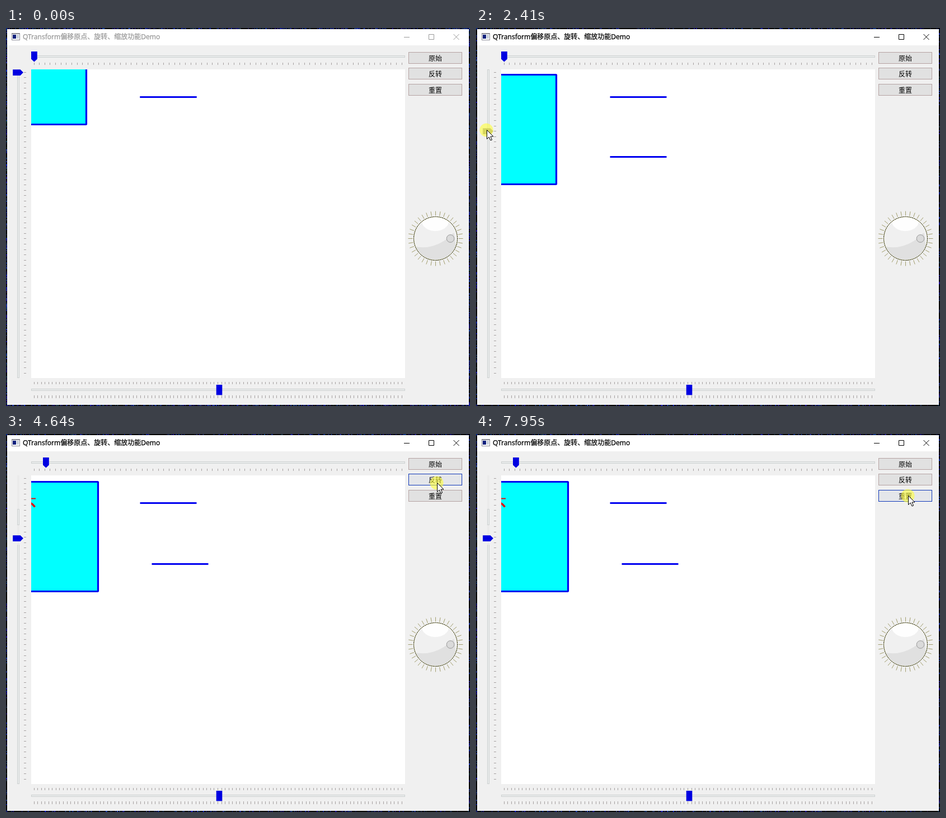
Write an HTML page with a canvas that moves like this. It is 829 by 676 pixels and loops after 8000 ms.

```html
<!DOCTYPE html>
<html lang="zh">
<head>
<meta charset="utf-8">
<title>QTransform Demo</title>
<style>
  html, body { margin: 0; width: 100%; height: 100%; overflow: hidden; background: #000; }
  canvas, svg { position: absolute; left: 0; top: 0; display: block; }
  text { font: 12px "Noto Sans", "Noto Sans CJK SC", "Noto Sans CJK", sans-serif; }
  .crisp { shape-rendering: crispEdges; }
  .track { fill: #e9ebeb; stroke: #cdd1d1; }
  .handle { fill: #0000e1; }
  .tick { stroke: #a5a0a0; fill: none; }
  .pen { stroke: #0000f0; stroke-width: 3.2; }
  .button rect { fill: #e1e1e1; stroke: #b5a3a3; }
  .button.hover rect { fill: #e4e6ea; stroke: #1038b8; }
  .button text { text-anchor: middle; }
  #caption text { fill: currentColor; stroke: currentColor; stroke-width: .25; }
</style>
</head>
<body>
<canvas id="desktop" width="829" height="676"></canvas>
<svg width="829" height="676" viewBox="0 0 829 676">
  <defs>
    <clipPath id="viewClip"><rect x="45" y="74" width="668" height="552"/></clipPath>
    <clipPath id="dialClip"><circle cx="767.5" cy="376.5" r="39"/></clipPath>
  </defs>
  <rect x="2" y="2" width="825" height="672" fill="#f0f0f0"/>
  <rect x="2" y="2" width="825" height="29" fill="#fff"/>

  <g class="crisp">
    <rect x="10" y="9" width="15" height="13" fill="#8c8c96"/>
    <rect x="11" y="11" width="13" height="10" fill="#fff"/>
    <rect x="12" y="12" width="6" height="7" fill="#10207c"/>
    <rect x="19" y="12" width="4" height="7" fill="#c8d0dc"/>
  </g>
  <g id="caption">
    <text x="30" y="20.3">QTransform偏移原点、旋转、缩放功能Demo</text>
    <path d="M711 16.5h10M755.5 11.5h9v9h-9zM799.5 11l10 10M809.5 11l-10 10" fill="none" stroke="currentColor"/>
  </g>

  <g class="crisp">
    <rect class="track" x="45.5" y="49.5" width="667" height="3"/>
    <rect class="track" x="20.5" y="74.5" width="3" height="551"/>
    <rect class="track" x="45.5" y="645.5" width="667" height="3"/>
    <g id="wornTrack">
      <rect x="20" y="74" width="4" height="124" fill="#ebebeb"/>
      <rect class="track" x="20.5" y="134.5" width="3" height="28"/>
    </g>
    <path id="ticks" class="tick"/>
  </g>
  <path id="topHandle" class="handle" d="M45 42h10.8v13.4l-5.4 5.2l-5.4-5.2z"/>
  <path id="leftHandle" class="handle" d="M12.2 74.2h13.4l5.3 5.4l-5.3 5.4h-13.4z"/>
  <rect class="handle" x="375.7" y="638" width="10.6" height="18.4"/>

  <rect x="45" y="74" width="668" height="552" fill="#fff"/>
  <g clip-path="url(#viewClip)">
    <g id="shape">
      <rect class="pen" x="-52.5" y="-23.5" width="196" height="196" fill="#0ff" stroke-linejoin="bevel"/>
      <path d="M18 6.5h14" stroke="#e01010" stroke-width="2"/>
      <path d="M23 14.5q4 2 7.5 7" fill="none" stroke="#e01010" stroke-width="3.6"/>
      <path class="pen" d="M239.5 123.5h101"/>
    </g>
    <path class="pen" d="M239.5 123.5h101"/>
  </g>

  <path id="dialTicks" fill="none" stroke="#a19d6c"/>
  <g clip-path="url(#dialClip)">
    <circle cx="767.5" cy="376.5" r="39" fill="#f0f0f0"/>
    <path d="M726 390Q768 400 800 366L809 420H726z" fill="#e0e0e0"/>
    <ellipse cx="767" cy="346" rx="24" ry="17" fill="#fefefe"/>
  </g>
  <g fill="none">
    <circle cx="767.5" cy="376.5" r="39" stroke="#d9d78c"/>
    <circle cx="767.5" cy="376.5" r="39" stroke="#000" stroke-dasharray="2 1.2"/>
  </g>
  <circle cx="794" cy="376.5" r="6.8" fill="#dadada" stroke="#999"/>

  <g id="buttons"></g>
  <circle id="halo" r="12" fill="#ffff38" fill-opacity=".6"/>
  <path id="cursor" d="M.5 .5V16.5L4.2 13L7 19L9.6 18L6.9 12H12z" fill="#fff" stroke="#000"/>
</svg>
<script>
const LOOP = 8000, ENTER = 320, STEP = 110;
const $ = id => document.getElementById(id);

// Pointer journey: each leg eases to its goal, then rests there
const legs = [
  { from: ENTER, lasts: 880, x: 11, y: 74 },
  { from: 1200, lasts: 300, x: 19, y: 75 },
  { from: 1500, lasts: 1000, x: 19, y: 184 },
  { from: 2600, lasts: 370, x: 52, y: 48 },
  { from: 3090, lasts: 440, x: 73, y: 48 },
  { from: 3530, lasts: 560, x: 774, y: 120 },
  { from: 4090, lasts: 440, x: 770, y: 87 },
  { from: 5620, lasts: 310, x: 770, y: 55 },
  { from: 6710, lasts: 440, x: 772, y: 125 },
  { from: 7490, lasts: 340, x: 772, y: 110 }
];
const leftDrag = { from: 1430, to: 2510 };
const topDrag = { from: 2960, to: 3530 };
const [invertClick, restoreClick, resetClick] =
  [4600, 5930, 7830].map(from => ({ from, to: from + 200 }));
const presses = [leftDrag, topDrag, invertClick, restoreClick, resetClick];

const clamp = (v, low, high) => Math.min(high, Math.max(low, v));
const within = (v, low, high) => v >= low && v < high;
const during = (t, span) => within(t, span.from, span.to);
const smooth = p => p * p * (3 - 2 * p);

function pointerAt(t) {
  return legs.reduce((at, leg) => {
    const p = smooth(clamp((t - leg.from) / leg.lasts, 0, 1));
    return { x: at.x + (leg.x - at.x) * p, y: at.y + (leg.y - at.y) * p };
  }, { x: 475, y: 505 });
}

function dragged(t, span, axis) {
  const now = pointerAt(clamp(t, span.from, span.to));
  return Math.max(0, Math.round(now[axis] - (axis === 'x' ? 52 : 75)));
}

const move = (id, x, y) => $(id).setAttribute('transform', `translate(${x} ${y})`);
const show = (id, on) => { $(id).style.display = on ? '' : 'none'; };

function series(count, from, to, draw) {
  return Array.from({ length: count + 1 }, (_, i) =>
    draw(Math.floor(from + (to - from) * i / count) + .5)).join('');
}

$('ticks').setAttribute('d',
  series(68, 50, 707, x => `M${x} 62v4`) +
  series(56, 79, 617, y => `M32 ${y}h4`) +
  series(100, 50, 707, x => `M${x} 633v4M${x} 657v5`));

$('dialTicks').setAttribute('d', Array.from({ length: 36 }, (_, i) => {
  const a = i * Math.PI / 18;
  const at = r => `${767.5 + r * Math.cos(a)} ${376.5 + r * Math.sin(a)}`;
  return `M${at(41)}L${at(49)}`;
}).join(''));

const buttonTop = i => Math.round(43 + 28.3 * i);
$('buttons').innerHTML = ['原始', '反转', '重置'].map((label, i) =>
  `<g class="button"><rect class="crisp" x="719.5" y="${buttonTop(i) + .5}" width="95" height="20"/>
   <text x="767" y="${buttonTop(i) + 15.5}">${label}</text></g>`).join('');
const buttons = [...$('buttons').children];

// Thin strip of desktop visible around the window
function paintDesktop(density) {
  const g = $('desktop').getContext('2d');
  let seed = 31;
  const rand = () => (seed = seed * 16807 % 2147483647) / 2147483647;
  const dot = (x, y) => {
    if (rand() > density) return;
    g.fillStyle = `rgb(${rand() * 40}, ${rand() * 70}, ${60 + rand() * 150})`;
    g.fillRect(x, y, 1 + rand(), 1 + rand());
  };
  g.fillStyle = '#000';
  g.fillRect(0, 0, 829, 676);
  for (let x = 0; x < 829; x++) { dot(x, 0); dot(x, 674); }
  for (let y = 0; y < 676; y++) { dot(0, y); dot(827, y); }
}

let wasActive = null;

function render(now) {
  const clock = now % LOOP;
  const t = ENTER + Math.floor((clock - ENTER) / STEP) * STEP;
  const { x, y } = pointerAt(t);
  const dx = dragged(t, topDrag, 'x'), dy = dragged(t, leftDrag, 'y');
  const active = t >= leftDrag.from;
  const inverted = within(t, invertClick.from + STEP, restoreClick.from + STEP);

  move('cursor', Math.round(x), Math.round(y));
  move('halo', Math.round(x) - .5, Math.round(y) + .5);
  show('cursor', t >= ENTER);
  show('halo', presses.some(span => during(t, span)));

  const sign = inverted ? -1 : 1;
  move('shape', sign * dx, sign * dy);
  move('topHandle', dx, 0);
  move('leftHandle', 0, Math.round(dy * .98));
  $('leftHandle').style.fill = during(t, leftDrag) ? '#969696' : '';
  $('topHandle').style.fill = during(t, topDrag) ? '#969696' : '';
  show('wornTrack', t >= leftDrag.to);

  buttons.forEach((button, i) => button.classList.toggle('hover',
    within(x, 719, 815) && within(y, buttonTop(i), buttonTop(i) + 21)));

  if (active !== wasActive) {
    $('caption').style.color = active ? '#000' : '#999';
    paintDesktop(active ? .2 : .4);
    wasActive = active;
  }
}

const start = performance.now();
function loop() {
  render(performance.now() - start);
  requestAnimationFrame(loop);
}
loop();
</script>
</body>
</html>
```
